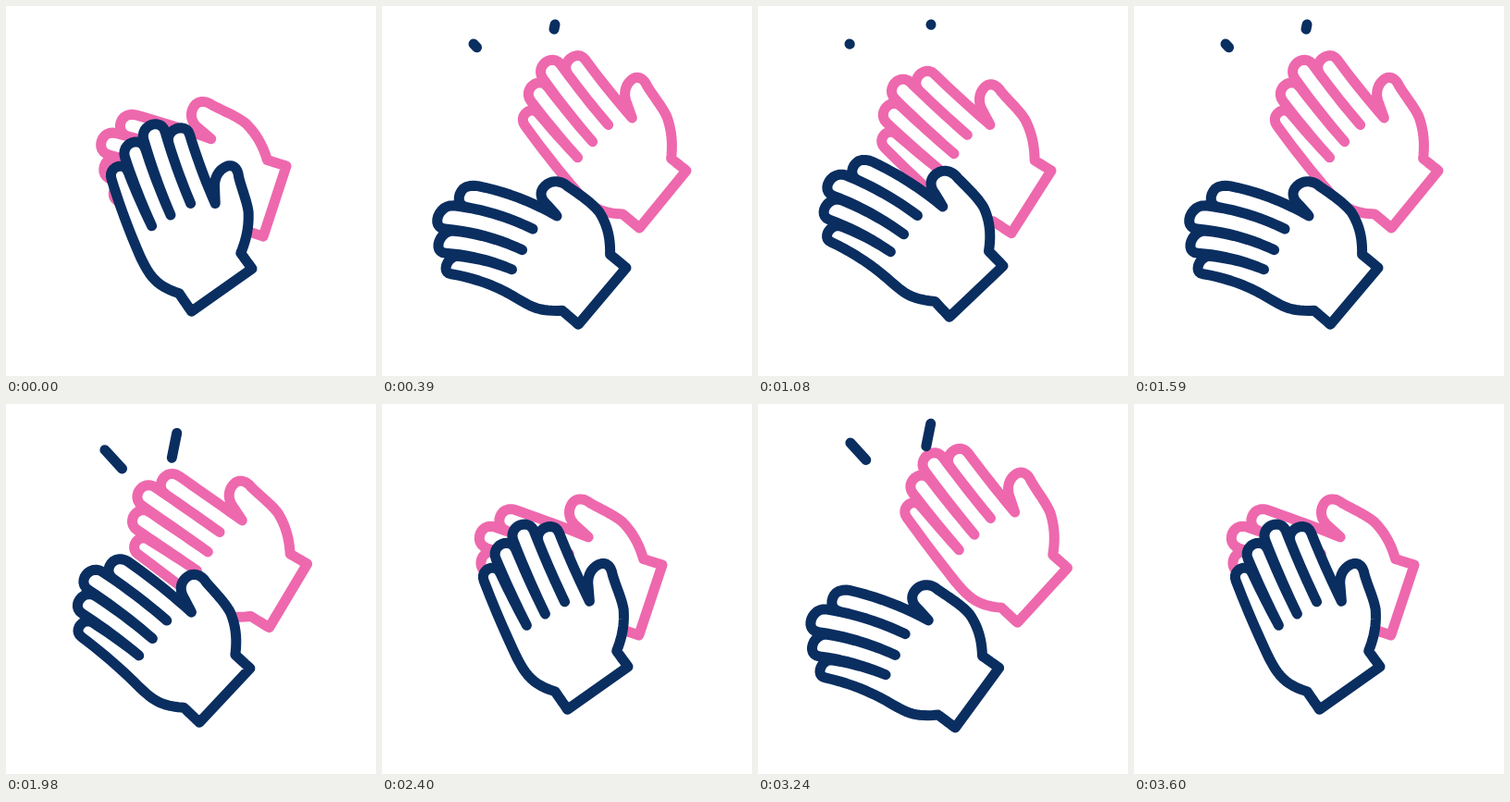
Write an HTML page with a canvas that moves like this. It is 400x400 px and loops after 3.63 s.

```html
<!DOCTYPE html>
<html lang="en">
<head>
<meta charset="utf-8">
<title>Clapping hands</title>
<style>
  html, body { margin: 0; width: 100%; height: 100%; overflow: hidden; background: #fff; }
  canvas { display: block; width: 400px; height: 400px; }
</style>
</head>
<body>
<canvas id="stage" width="400" height="400"></canvas>
<script>
const ctx = document.getElementById('stage').getContext('2d');
const NAVY = '#0a2e60', PINK = '#ee68ae';
const STEP = 30, LOOP = 3630, CLAP = 20;

// Hand at rest: straight fingers, anchored at the outer cuff corner.
const ANCHOR = [266, 286], TILT = 35.9 * Math.PI / 180, WRIST = 12;

function buildHand() {
  const pts = [ANCHOR];
  const last = () => pts[pts.length - 1];
  const line = (x, y) => {
    const [a, b] = last();
    for (let i = 1; i <= 10; i++) pts.push([a + (x - a) * i / 10, b + (y - b) * i / 10]);
  };
  const curve = (x1, y1, x2, y2, x, y) => {
    const [a, b] = last();
    for (let i = 1; i <= 12; i++) {
      const t = i / 12, s = 1 - t;
      const mix = (p, q, r, e) => s * s * s * p + 3 * s * s * t * q + 3 * s * t * t * r + t * t * t * e;
      pts.push([mix(a, x1, x2, x), mix(b, y1, y2, y)]);
    }
  };
  // Up one edge from the gap, then round the tip.
  const finger = (gx, gy, rx, ry, lx, ly) => {
    line(gx, gy);
    line(rx, ry);
    const k = 0.667, ex = (ry - ly) * k, ey = (lx - rx) * k;
    curve(rx + ex, ry + ey, lx + ex, ly + ey, lx, ly);
  };
  line(252, 270);
  curve(257, 252, 257, 238, 254, 224);
  curve(250, 212, 243, 202, 236, 188);
  curve(233, 179, 226, 175, 219, 179);
  curve(210, 184, 208, 194, 211, 203);
  finger(215, 219, 167, 151, 147, 165);
  finger(188, 223, 139, 154, 119, 168);
  finger(169, 239, 124, 177, 105, 191);
  finger(151, 254, 113, 205, 97, 216);
  line(145, 289);
  curve(157, 306, 165, 315, 190, 320);
  line(205, 338);
  return pts.map(([x, y]) => {
    const dx = x - ANCHOR[0], dy = y - ANCHOR[1], s = Math.sin(TILT), c = Math.cos(TILT);
    return [-dx * s - dy * c, dx * c - dy * s];
  });
}
const HAND = buildHand();

// phase, x, y, rotation in degrees, finger bend
const FRONT = [
  [0, 266, 284, -5.3, -14],
  [1, 266, 284, -5.2, -9],
  [5, 266, 286, 0, 0],
  [10, 260, 285, 14.5, 39],
  [14, 264, 283, 9.4, 42],
  [17, 265, 281, 3.1, 32]
];
const BACK = [
  [0, 303, 173, 31.4, 9],
  [1, 303, 174, 31.2, 5],
  [5, 316, 170, 27.8, 6],
  [10, 336, 178, 5, -8],
  [14, 329, 178, 10.3, -10],
  [17, 317, 178, 17.1, -7]
];

// Periodic monotone cubic through the keys.
function poseAt(keys, phase) {
  const n = keys.length;
  const key = (i, c) => keys[(i + n) % n][c] + (c ? 0 : Math.floor(i / n) * CLAP);
  const slope = (i, c) => (key(i + 1, c) - key(i, c)) / (key(i + 1, 0) - key(i, 0));
  const tangent = (i, c) => {
    const a = slope(i - 1, c), b = slope(i, c);
    return a * b > 0 ? 2 * a * b / (a + b) : 0;
  };
  let i = n - 1;
  while (keys[i][0] > phase) i--;
  const span = key(i + 1, 0) - key(i, 0), t = (phase - key(i, 0)) / span, s = 1 - t;
  return [1, 2, 3, 4].map(c =>
    key(i, c) * s * s * (1 + 2 * t) + key(i + 1, c) * t * t * (1 + 2 * s) +
    span * t * s * (tangent(i, c) * s - tangent(i + 1, c) * t));
}

function drawHand(keys, phase, color) {
  const [x, y, turn, curl] = poseAt(keys, phase);
  const bend = curl * 1e-4 || 1e-6;
  const dir = TILT + turn * Math.PI / 180, s = Math.sin(dir), c = Math.cos(dir);
  ctx.beginPath();
  for (let [h, w] of HAND) {
    if (h > WRIST) {
      const a = bend * (h - WRIST), side = Math.min(w + 52, 46);
      h = WRIST + Math.sin(a) / bend + 0.7 * side * Math.sin(a);
      w -= (1 - Math.cos(a)) / bend;
    }
    ctx.lineTo(x - h * s + w * c, y - h * c - w * s);
  }
  ctx.closePath();
  ctx.fillStyle = '#fff';
  ctx.fill();
  ctx.strokeStyle = color;
  ctx.stroke();
}

function easeOut(p, from, to) {
  const t = Math.min(1, Math.max(0, (p - from) / (to - from)));
  return 1 - (1 - t) * (1 - t);
}

function drawSpark(x1, y1, x2, y2, phase) {
  const head = easeOut(phase, 3, 10), tail = easeOut(phase, 4, 18);
  if (head <= tail) return;
  ctx.beginPath();
  ctx.moveTo(x1 + (x2 - x1) * tail, y1 + (y2 - y1) * tail);
  ctx.lineTo(x1 + (x2 - x1) * head, y1 + (y2 - y1) * head);
  ctx.strokeStyle = NAVY;
  ctx.stroke();
}

function render(now) {
  const n = Math.floor(now % LOOP / STEP);
  const phase = (n ? n + 1 : 0) % CLAP;
  ctx.fillStyle = '#fff';
  ctx.fillRect(0, 0, 400, 400);
  ctx.lineWidth = 11;
  ctx.lineCap = ctx.lineJoin = 'round';
  drawHand(BACK, phase, PINK);
  drawHand(FRONT, phase, NAVY);
  drawSpark(142, 88, 99, 41, phase);
  drawSpark(174.5, 82, 187, 20, phase);
}

const start = performance.now();
function tick() {
  render(performance.now() - start);
  requestAnimationFrame(tick);
}
tick();
</script>
</body>
</html>
```
